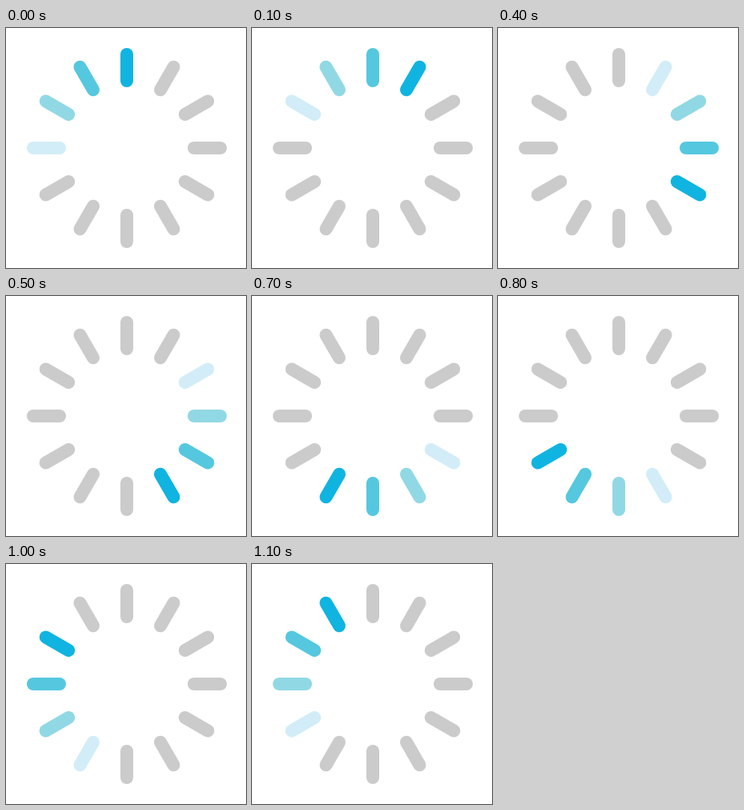
An HTML page with a canvas for the animation above (1200 ms loop, 300x300 px).

```html
<!DOCTYPE html>
<html lang="en">
<head>
<meta charset="utf-8">
<title>Spinner</title>
<style>
html, body { margin: 0; width: 100%; height: 100%; overflow: hidden; background: #fff; }
canvas { display: block; width: 300px; height: 300px; }
</style>
</head>
<body>
<canvas id="stage" width="300" height="300"></canvas>
<script>
const ctx = document.getElementById('stage').getContext('2d');
const BARS = 12, STEP = 100;
const CX = 151, CY = 150, INNER = 84, OUTER = 117;
const GREY = '#cbcbcb';
const TAIL = ['#10b4e0', '#55c8df', '#91d8e5', '#d2edf7'];

function drawBar(index, color) {
  const angle = index * 2 * Math.PI / BARS;
  const dx = Math.sin(angle), dy = -Math.cos(angle);
  ctx.strokeStyle = color;
  ctx.beginPath();
  ctx.moveTo(CX + INNER * dx, CY + INNER * dy);
  ctx.lineTo(CX + OUTER * dx, CY + OUTER * dy);
  ctx.stroke();
}

function draw(time) {
  const head = Math.floor(time / STEP) % BARS;
  ctx.fillStyle = '#fff';
  ctx.fillRect(0, 0, 300, 300);
  ctx.lineWidth = 16;
  ctx.lineCap = 'round';
  for (let i = 0; i < BARS; i++) {
    const age = (head - i + BARS) % BARS;
    drawBar(i, TAIL[age] || GREY);
  }
}

const start = performance.now();
function tick() {
  draw(performance.now() - start);
  requestAnimationFrame(tick);
}
tick();
</script>
</body>
</html>
```
